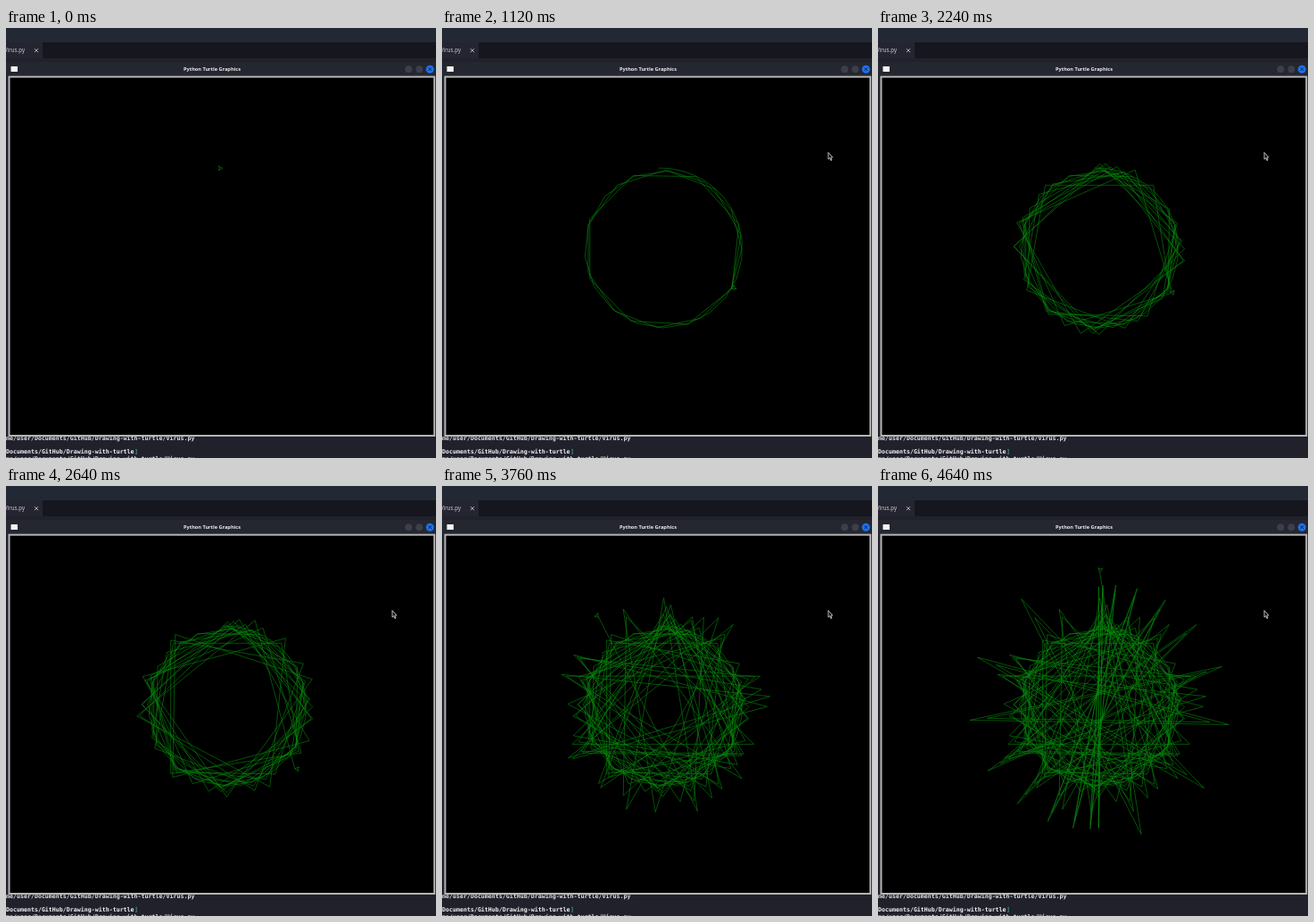
Animation of 482x482 px, one loop 4960 ms. Source, as an HTML page with a canvas:

```html
<!DOCTYPE html>
<html lang="en">
<head>
<meta charset="utf-8">
<title>Python Turtle Graphics</title>
<style>
  html, body { margin: 0; overflow: hidden; background: #20212b; }
  canvas { display: block; }
</style>
</head>
<body>
<canvas id="stage" width="482" height="482"></canvas>
<script>
const ctx = document.getElementById('stage').getContext('2d');
const LOOP = 4960, TICK = 80, LAST_TICK = 58;
const SCALE = 0.4985, START = { x: 242.7, y: 157.1 };
const GREEN = '#08860c';
// [tick, turtle commands done]; each step is forward(3n), then right(n)
const PACE = [[0, 0], [14, 98], [23, 160], [33, 230], [39, 275], [47, 326], [56, 388], [58, 398]];

const rad = degrees => degrees * Math.PI / 180;

const path = [START];
for (let n = 1; n < 200; n++) {
  const heading = rad(n * (n - 1) / 2), { x, y } = path[n - 1];
  path.push({
    x: x + 3 * n * SCALE * Math.cos(heading),
    y: y + 3 * n * SCALE * Math.sin(heading)
  });
}

function commandsAt(tick) {
  const i = Math.max(1, PACE.findIndex(p => p[0] >= tick));
  const [t0, c0] = PACE[i - 1], [t1, c1] = PACE[i];
  return Math.round(c0 + (c1 - c0) * (tick - t0) / (t1 - t0));
}

function rect(color, x, y, w, h) {
  ctx.fillStyle = color;
  ctx.fillRect(x, y, w, h);
}

function text(str, x, y, font, color, align = 'left') {
  ctx.font = font;
  ctx.fillStyle = color;
  ctx.textAlign = align;
  ctx.fillText(str, x, y);
}

function disc(x, y, r, color) {
  ctx.fillStyle = color;
  ctx.beginPath();
  ctx.arc(x, y, r, 0, 2 * Math.PI);
  ctx.fill();
}

function line(x0, y0, x1, y1) {
  ctx.beginPath();
  ctx.moveTo(x0, y0);
  ctx.lineTo(x1, y1);
  ctx.stroke();
}

function cross(x, y, r, color) {
  ctx.strokeStyle = color;
  ctx.lineWidth = 0.9;
  line(x - r, y - r, x + r, y + r);
  line(x - r, y + r, x + r, y - r);
}

function polygon(points, fill, stroke, width) {
  ctx.beginPath();
  points.forEach(([x, y]) => ctx.lineTo(x, y));
  ctx.closePath();
  ctx.fillStyle = fill;
  ctx.fill();
  ctx.strokeStyle = stroke;
  ctx.lineWidth = width;
  ctx.stroke();
}

function drawDesktop() {
  rect('#20212b', 0, 0, 482, 482);
  rect('#222935', 0, 0, 482, 16);
  rect('#16171e', 0, 16, 482, 18);
  rect('#242530', 0, 16, 41, 18);
  text('Virus.py', 21, 27.2, '6.2px "Open Sans", sans-serif', '#d4d5da', 'right');
  cross(34, 25.2, 2, '#c8c9ce');

  const mono = 'bold 6.64px "DejaVu Sans Mono", monospace';
  const folder = 'Documents/GitHub/Drawing-with-turtle';
  for (const y of [461.5, 485]) text(`me/user/${folder}/Virus.py`, 0, y, mono, '#dcdde2');
  text(folder, 0, 477, mono, '#f2f2f4');
  text(']', 144, 477, mono, '#3f9f8c');
}

function drawWindow() {
  rect('#242630', 0, 38, 482, 16);
  rect('#f4f4f4', 5.5, 43, 7.5, 6);
  text('Python Turtle Graphics', 231, 48.2, 'bold 5.6px "Open Sans", sans-serif', '#eeeef0', 'center');
  disc(451.3, 46.3, 4, '#3c3e4a');
  disc(463.3, 46.3, 4, '#3c3e4a');
  disc(475.2, 46.2, 4.5, '#1b72ee');
  cross(475.2, 46.2, 1.7, '#101a30');

  rect('#000', 3, 54, 478, 403);
  ctx.strokeStyle = '#b4b4b6';
  ctx.lineWidth = 2;
  ctx.strokeRect(3.5, 54.7, 476.7, 402.3);
}

function drawTurtle(commands) {
  const step = Math.ceil(commands / 2), turned = commands % 2 === 0;
  ctx.strokeStyle = GREEN;
  ctx.lineWidth = 0.62;
  for (let n = 1; n <= step; n++) {
    line(path[n - 1].x, path[n - 1].y, path[n].x, path[n].y);
  }
  ctx.save();
  ctx.translate(path[step].x, path[step].y);
  ctx.rotate(rad(step * (turned ? step + 1 : step - 1) / 2));
  ctx.scale(SCALE, SCALE);
  polygon([[0, 0], [-9, 5], [-7, 0], [-9, -5]], '#000', GREEN, 1.3);
  ctx.restore();
}

function drawPointer() {
  ctx.save();
  ctx.translate(433, 139.5);
  polygon([[0, 0], [0, 7.6], [1.7, 6.2], [2.9, 9], [4, 8.5], [2.8, 5.8], [4.8, 5.5]], '#111', '#e4e4e4', 0.8);
  ctx.restore();
}

function render(now) {
  const tick = Math.min(LAST_TICK, Math.floor(now % LOOP / TICK));
  drawDesktop();
  drawWindow();
  drawTurtle(commandsAt(tick));
  if (tick > 0) drawPointer();
}

let begin;
function frame(now) {
  begin ??= now;
  render(now - begin);
  requestAnimationFrame(frame);
}
render(0);
requestAnimationFrame(frame);
</script>
</body>
</html>
```
